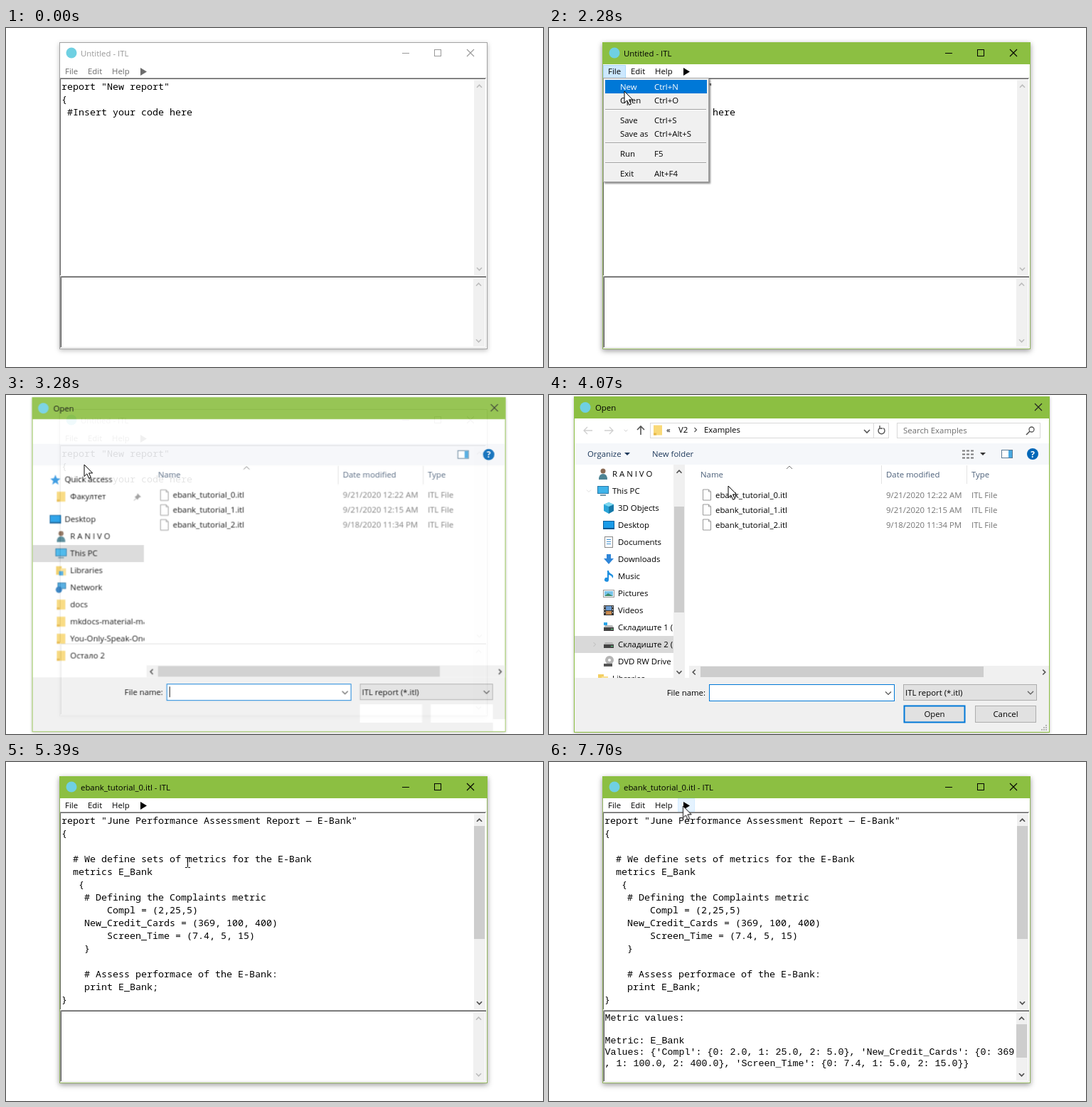
Recreate the animation shown at these times as an HTML page. Size 755x477 px, loop 8000 ms.

```html
<!DOCTYPE html>
<html lang="en">
<head>
<meta charset="utf-8">
<title>ITL editor</title>
<style>
html, body { margin: 0; width: 100%; height: 100%; overflow: hidden; background: #fff; }
svg { display: block; width: 755px; height: 477px; }
text { font: 11.4px "Open Sans", "Noto Sans", sans-serif; white-space: pre; }
.code text { font: 13.33px "Noto Sans Mono", "DejaVu Sans Mono", monospace; }
.out text { font: 13.33px "Liberation Mono", monospace; }
#dialog { transform-origin: 369.5px 238px; }
.shade { filter: drop-shadow(0 2px 3px rgba(0,0,0,.25)); }
.deep { filter: drop-shadow(0 3px 4px rgba(0,0,0,.18)); }
.thin { filter: drop-shadow(0 1px 2px rgba(0,0,0,.25)); }
.drop { filter: drop-shadow(2px 2px 1px rgba(0,0,0,.45)); }
</style>
</head>
<body>
<svg id="stage" viewBox="0 0 755 477"></svg>
<script>
const LOOP = 8000, GREEN = '#8cbf42', BLUE = '#0078d7';

// Drawing helpers
const T = (x, y, s, fill = '#000', more = '') => `<text x="${x}" y="${y}" fill="${fill}" ${more}>${s}</text>`;
const R = (x, y, w, h, fill, more = '') => `<rect x="${x}" y="${y}" width="${w}" height="${h}" fill="${fill}" ${more}/>`;
const box = (x, y, w, h, fill, stroke, sw = 1, cls = '') =>
  R(x + .5, y + .5, w - 1, h - 1, fill, `stroke="${stroke}" stroke-width="${sw}" class="${cls}"`);
const L = (d, stroke, w = 1, more = '') => `<path d="${d}" fill="none" stroke="${stroke}" stroke-width="${w}" ${more}/>`;
const P = (d, fill) => `<path d="${d}" fill="${fill}"/>`;
const C = (x, y, r, fill) => `<circle cx="${x}" cy="${y}" r="${r}" fill="${fill}"/>`;
const G = (id, s, more = '') => `<g id="${id}" ${more}>${s}</g>`;
const turns = { up: 0, right: 90, down: 180, left: 270 };
const chev = (x, y, dir, color, r = 3.5, w = 1.6) =>
  L(`M${-r} ${r / 2}L0 ${-r / 2}L${r} ${r / 2}`, color, w, `transform="translate(${x} ${y}) rotate(${turns[dir]})"`);
const lines = (x, y, step, list) => list.map((s, i) => s && T(x, y + i * step, s)).join('');
const cross = (x, y, c) => L(`M${x - 5} ${y - 5}l10 10m0-10l-10 10`, c, 1.1);
const bars = (x, top, bottom, c) => chev(x, top, 'up', c) + chev(x, bottom, 'down', c);

// Main window
const controls = c => L('M557 35.5h10', c) + box(602, 30, 10, 10, 'none', c) + cross(653, 35, c);
const menuBar = c => T(83, 65, 'File', c) + T(115, 65, 'Edit', c) + T(149, 65, 'Help', c) + P('M189 56l9 5.5-9 5.5z', c);
const badge = (x, y) => C(x, y, 7.5, '#6fd0e2');

const base =
  box(75, 20, 602, 432, '#fff', '#a3a3a3', 1, 'shade') +
  badge(92, 35) + T(105, 39.5, 'Untitled - ITL', '#999') + controls('#999') + menuBar('#6d6d6d');

const active =
  box(75, 20, 602, 432, '#fff', '#92b35f', 1, 'deep') +
  R(75, 20, 602, 31, GREEN) + badge(92, 35) + controls('#000') +
  G('title1', T(105, 39.5, 'Untitled - ITL')) +
  G('title2', T(105, 39.5, 'ebank_tutorial_0.itl - ITL')) +
  G('fileOn', box(76, 52, 32, 19, '#cce8ff', '#a9d8fb')) +
  G('runOn', box(181, 51, 24, 19, '#e5f3ff', '#d5ecff')) + G('runDown', R(181, 51, 24, 19, '#cce8ff')) +
  menuBar('#000');

const panes =
  R(76, 70, 599, 279, '#fff') + L('M76 70.5H675', '#a0a0a0') + L('M76.5 348V71.5H674', '#696969') +
  R(658, 73, 16, 275, '#f0f0f0') + bars(665.5, 82, 339, '#bcbcbc') +
  R(76, 349, 599, 101, '#fff') + L('M76.5 450V349.5H675', '#a0a0a0') + L('M77.5 449V350.5H675', '#555') +
  L('M77 449.5H674.5V351', '#e3e3e3') +
  R(657, 352, 16, 96, '#f0f0f0') + bars(664.5, 361, 440, '#bcbcbc');

const code1 = lines(78, 87, 18, ['report "New report"', '{', ' #Insert your code here']);
const code2 = lines(78, 87, 18, [
  'report "June Performance Assessment Report — E-Bank"', '{', '',
  '  # We define sets of metrics for the E-Bank', '  metrics E_Bank', '   {',
  '    # Defining the Complaints metric', '        Compl = (2,25,5)',
  '    New_Credit_Cards = (369, 100, 400)', '        Screen_Time = (7.4, 5, 15)', '    }', '',
  '    # Assess performace of the E-Bank:', '    print E_Bank;', '}']);
const output = lines(78.5, 364, 16, [
  'Metric values:', '', 'Metric: E_Bank',
  "Values: {'Compl': {0: 2.0, 1: 25.0, 2: 5.0}, 'New_Credit_Cards': {0: 369",
  ", 1: 100.0, 2: 400.0}, 'Screen_Time': {0: 7.4, 1: 5.0, 2: 15.0}}"]);

// File menu
const item = (y, name, key, c) => T(100, y, name, c) + T(148, y, key, c);
const lit = (y, name, key) => R(79, y - 14, 143, 19, BLUE) + item(y, name, key, '#fff');
const menu =
  box(76, 70, 149, 147, '#f0f0f0', '#a0a0a0', 1, 'drop') +
  [114, 161, 189].map(y => R(79, y, 142, 1, '#a0a0a0') + R(79, y + 1, 142, 1, '#fff')).join('') +
  item(87, 'New', 'Ctrl+N') + item(106, 'Open', 'Ctrl+O') + item(134, 'Save', 'Ctrl+S') +
  item(153, 'Save as', 'Ctrl+Alt+S') + item(181, 'Run', 'F5') + item(209, 'Exit', 'Alt+F4') +
  G('newOn', lit(87, 'New', 'Ctrl+N')) + G('openOn', lit(106, 'Open', 'Ctrl+O'));

// 16 by 16 icons
const sheet = box(2, 0, 12, 16, '#fff', '#8a8a8a');
const drive = R(1, 8, 14, 5, '#444') + P('M3 5h10l2 3H1z', '#b8b8b8') + R(11, 10, 3, 1, '#5fe08a');
const icons = {
  folder: R(2, 1, 12, 14, '#f9d978') + R(2, 12, 4, 3, '#e8b94a'),
  user: C(8, 4, 3.5, '#8a6b55') + P('M2 16q0-8 6-8t6 8z', '#4d8494'),
  pc: box(0, 1, 16, 11, '#3fb4ea', '#2878a8') + R(4, 13, 8, 2, '#7799aa'),
  cube: P('M8 0l7 3v9l-7 4-7-4V3z', '#2aa5d8') + P('M8 6l7-3v9l-7 4z', '#1679a8') + P('M8 0l7 3-7 3-7-3z', '#7fd8f0'),
  desktop: box(0, 2, 16, 12, '#1a9be8', '#0c5f9c') + R(1, 12, 14, 1, '#0c4f82'),
  doc: sheet + L('M5 4.5h6M5 7.5h6M5 10.5h6', '#3d8fd0'),
  down: P('M5 1h6v6h4l-7 8-7-8h4z', '#2f86d8'),
  note: P('M6 0h2q0 3 4 5t1 6q0-4-5-5v7a3 3 0 1 1-2-3z', '#1d8fe0'),
  pic: box(0, 3, 16, 11, '#fff', '#999') + R(2, 5, 12, 7, '#78c4ea') + P('M2 12l5-4 7 4z', '#3f8a68'),
  film: R(1, 1, 14, 14, '#333') + R(4, 2, 8, 6, '#6b9bd0') + R(4, 9, 8, 5, '#c78a50') +
    L('M2.5 2v12M13.5 2v12', '#ddd', 1, 'stroke-dasharray="2 2"'),
  drive,
  sys: drive + R(1, 1, 5, 4, '#2aa5e8'),
  disc: C(9, 6, 6, '#b5b5b5') + C(9, 6, 2, '#fff') + R(1, 11, 12, 4, '#555'),
  libs: R(1, 2, 8, 12, '#f3cf63') + R(6, 5, 9, 10, '#f9df90') + R(5, 9, 6, 6, '#48a8e0'),
  star: P('M8 1l2 5 5 .5-4 3.5 1.5 5-4.5-3-4.5 3 1.5-5-4-3.5 5-.5z', '#2c93e0'),
  net: box(3, 1, 12, 9, '#48a8e0', '#2878a8') + C(5, 11, 4.5, '#2c7cc0'),
  page: P('M2.5 .5h8l3 3v12h-11z', '#fff') + L('M2.5 .5h8l3 3v12h-11zM10.5 .5v3h3', '#999')
};
const icon = (k, x, y) => `<g transform="translate(${x} ${y - 8})">${icons[k]}</g>`;
const entry = ([k, s], x, y) => icon(k, x - 21, y) + T(x, y + 4, s);

const person = 'R A N I V O';
const tree = [['user', person], ['pc', 'This PC'], ['cube', '3D Objects'], ['desktop', 'Desktop'], ['doc', 'Documents'],
  ['down', 'Downloads'], ['note', 'Music'], ['pic', 'Pictures'], ['film', 'Videos'], ['sys', 'Складиште 1 (E:)'],
  ['drive', 'Складиште 2 (F:)'], ['disc', 'DVD RW Drive'], ['libs', 'Libraries']];
const places = [['user', person], ['pc', 'This PC'], ['libs', 'Libraries'], ['net', 'Network'], ['folder', 'docs'],
  ['folder', 'mkdocs-material-master'], ['folder', 'You-Only-Speak-Once'], ['folder', 'Остало 2']];

const sideFirst = R(36, 211, 157, 24, '#d9d9d9') +
  entry(['star', 'Quick access'], 81, 118.5) + entry(['folder', 'Факултет'], 89, 142.5) +
  P('M184 138l5 5-3 1-2 3-4-4 3-2z', '#999') + L('M179 148l3-3', '#999') + entry(['desktop', 'Desktop'], 81, 174.5) +
  places.map((p, i) => entry(p, 89, 198.7 + i * 24.1)).join('');
const sideFull = R(36, 339, 139, 24, '#d9d9d9') + G('sideHover', R(36, 99, 139, 24, '#e5f3ff')) +
  G('twigs', chev(56, 135, 'down', '#ddd', 3, 1) + chev(64, 351, 'right', '#bbb', 3, 1)) +
  tree.map((p, i) => entry(p, i < 2 || i > 11 ? 89 : 97, 111 + i * 24)).join('') +
  R(175, 98, 16, 300, '#f0f0f0') + R(176, 157, 14, 149, '#cdcdcd') + bars(183, 108, 390, '#505050');

// Open dialog
const files = ['9/21/2020 12:22 AM', '9/21/2020 12:15 AM', '9/18/2020 11:34 PM'].map((d, i) => {
  const y = 140.5 + i * 21;
  return icon('page', 214, y) + T(234, y + 4, `ebank_tutorial_${i}.itl`) + T(474, y + 4, d, '#747474') + T(594, y + 4, 'ITL File', '#747474');
}).join('');

const arrow = (x, dir, c) => L(`M${x - dir * 6} 50h${dir * 12}m${-dir * 5}-5l${dir * 5} 5l${-dir * 5} 5`, c, 1.3);
const dash = y => `M581 ${y}h4m2 0h4m2 0h4`;
const chrome =
  arrow(55, -1, '#cfcfcf') + arrow(84, 1, '#cfcfcf') + chev(108, 50, 'down', '#cfcfcf', 2.5, 1) +
  L('M129 56V44m-5 5l5-5 5 5', '#555', 1.6) +
  box(142, 39, 336, 22, '#fff', '#d9d9d9') + icon('folder', 145, 49.5) + T(165, 53, '«') + T(182, 53, 'V2') +
  chev(206, 49, 'right', '#555', 3, 1.2) + T(218, 53, 'Examples') + chev(447, 51, 'down', '#555', 4) + L('M456.5 40v20', '#d9d9d9') +
  L('M470 46.5a4.5 4.5 0 1 1-5 0M465 43v4h4', '#555', 1.4) +
  box(489, 39, 202, 22, '#fff', '#d9d9d9') + T(498, 54, 'Search Examples', '#6d6d6d') +
  L('M676 51l-5 5', '#555', 1.6) + L('M675 48.5a3.5 3.5 0 1 1 7 0a3.5 3.5 0 1 1-7 0', '#555', 1.3) +
  T(54, 87, 'Organize', '#1e395b') + P('M106 81h8l-4 4z', '#1e395b') + T(145, 87, 'New folder', '#1e395b') +
  L(dash(78.5) + dash(83.5) + dash(88.5), '#7a7a7a', 2) + P('M606 81h8l-4 4z', '#333') +
  box(499, 437, 86, 24, '#e1e1e1', BLUE, 2) + T(542, 453, 'Open', '#000', 'text-anchor="middle"') +
  box(599, 437, 86, 24, '#e1e1e1', '#adadad') + T(642, 453, 'Cancel', '#000', 'text-anchor="middle"') +
  [0, 1, 2].map(r => [...Array(r + 1).keys()].map(c => R(698 - c * 3, 464 + r * 3, 2, 2, '#b5b5b5')).join('')).join('');
const blanks = R(498, 436, 88, 26, '#fff') + R(598, 436, 88, 26, '#fff') + R(686, 457, 17, 17, '#fff');

const dialog =
  box(35, 2, 669, 473, '#fff', GREEN, 1, 'thin') + R(35, 2, 669, 31, GREEN) +
  G('head', badge(51, 17.5) + T(65, 22, 'Open') + cross(688, 17, '#222')) + G('headBare', T(45, 22, 'Open')) +
  R(36, 68, 667, 30, '#f5f7fa') +
  box(636, 77, 16, 12, '#fff', '#5a7a94') + R(646, 78, 5, 10, '#48a8e0') +
  C(680, 83, 8, '#0067b8') + T(680, 87.5, '?', '#fff', 'text-anchor="middle" style="font-size:12px;font-weight:700"') +
  G('side1', sideFirst, 'clip-path="url(#clip1)"') + G('side2', sideFull, 'clip-path="url(#clip2)"') +
  T(213, 116, 'Name', '#4c607a') + T(474, 116, 'Date modified', '#4c607a') + T(594, 116, 'Type', '#4c607a') +
  L('M467.5 99v26M587.5 99v26', '#e3e3e3') + chev(338, 102, 'up', '#777', 4, 1) +
  G('rowHover', R(211, 131, 492, 21, '#e5f3ff')) + G('rowOn', box(211, 131, 492, 21, '#cce8ff', '#99d1ff')) + files +
  R(197, 381, 506, 17, '#f0f0f0') + R(213, 382, 398, 15, '#cdcdcd') +
  chev(204, 390, 'left', '#505050') + chev(696, 390, 'right', '#505050') +
  R(36, 398, 667, 76, '#f0f0f0') +
  T(220, 423, 'File name:', '#000', 'text-anchor="end"') + box(225, 407, 261, 24, '#fff', BLUE) + chev(477, 419.5, 'down', '#555', 4, 1.2) +
  G('caret', R(229, 411, 1, 15, '#000')) + G('chosen', T(229, 423, 'ebank_tutorial_0.itl')) +
  box(498, 407, 188, 23, '#e1e1e1', '#adadad') + T(501, 423, 'ITL report (*.itl)') + chev(677, 419, 'down', '#555', 4, 1.2) +
  G('blanks', blanks) + G('chrome', chrome);

const pointer =
  `<circle id="ring" cx="0" cy="4" r="11.5" fill="#f5ea40" fill-opacity=".78"/>` +
  G('arrow', `<path d="M0 0v16.5l3.8-3.6 2.9 6.4 2.7-1.2-2.9-6.2h5.2z" fill="#fff" stroke="#000"/>`) +
  G('beam', L('M-3-2.5h2.5l1 1 1-1h2.5M.5-1.5v12M-3 11.5h2.5l1-1 1 1h2.5', '#000'));

stage.innerHTML =
  `<clipPath id="clip1">${R(36, 98, 157, 300, '#000')}</clipPath><clipPath id="clip2">${R(36, 98, 155, 300, '#000')}</clipPath>` +
  base + G('active', active) + panes +
  G('code1', code1, 'class="code"') + G('code2', code2, 'class="code"') +
  G('thumb', R(658, 90, 15, 159, '#cdcdcd') + bars(665.5, 82, 339, '#505050')) +
  G('output', output + R(657, 369, 15, 47, '#cdcdcd') + bars(664.5, 361, 440, '#505050'), 'class="out"') +
  G('menu', menu) + G('dialog', dialog) + G('pointer', pointer);

// Timeline, in ms, written out as CSS keyframes
let css = '';
const pct = t => `${(t / LOOP * 100).toFixed(4)}%`;
const animate = (id, frames) => {
  css += `@keyframes ${id}{${frames.join('')}}#${id}{animation:${id} ${LOOP}ms step-end infinite}`;
};
const show = (id, ...spans) => {
  const keys = { 0: 0 };
  for (const [a, b] of spans) { keys[a] = 1; keys[b] = b < LOOP ? 0 : 1; }
  animate(id, Object.entries(keys).map(([t, o]) => `${pct(t)}{opacity:${o}}`));
};

show('active', [1430, 2830], [4790, LOOP]);
show('title1', [0, 5390]);
show('title2', [5390, LOOP]);
show('fileOn', [1360, 2750]);
show('runOn', [7094, LOOP]);
show('runDown', [7400, 7620]);
show('code1', [0, 5250]);
show('code2', [5250, LOOP]);
show('thumb', [5320, LOOP]);
show('output', [7620, LOOP]);
show('menu', [1590, 2750]);
show('newOn', [2120, 2349]);
show('openOn', [2349, 2750]);
show('head', [0, 4615]);
show('headBare', [4615, LOOP]);
show('side1', [0, 3440]);
show('side2', [3440, LOOP]);
show('sideHover', [3440, 3670]);
show('twigs', [3440, 4390]);
show('caret', [2900, 3440]);
show('blanks', [0, 3355]);
show('chrome', [3355, LOOP]);
show('rowHover', [4148, 4235]);
show('rowOn', [4235, 4790]);
show('chosen', [4235, 4790]);
show('arrow', [750, 4790], [7094, LOOP]);
show('beam', [4790, 7094]);
show('ring', [1360, 1510], [2501, 2750], [4235, 4790], [7400, 7620]);

// time, opacity, scale
animate('dialog', [
  [0, 0, 1], [2900, .1, .93], [2990, .35, .96], [3080, .6, .98], [3170, .8, .99], [3260, .9, .9955], [3355, 1, 1],
  [4550, .92, .997], [4615, .74, .989], [4710, .3, .96], [4790, 0, 1]
].map(([t, o, s]) => `${pct(t)}{opacity:${o};transform:scale(${s})}`));

// time, x, y, steps taken on the way to the next point
animate('pointer', [
  [0, 3, 190, 0], [750, 3, 190, 4], [1054, 56, 104, 4], [1358, 90, 60, 0],
  [2045, 90, 60, 4], [2349, 106, 89, 2], [2501, 110, 98, 0],
  [3662, 110, 98, 4], [3986, 225, 118, 2], [4148, 252, 128, 1], [4229, 255, 137, 0],
  [6480, 255, 137, 10], [7247, 188.5, 62, 0], [LOOP, 188.5, 62, 0]
].map(([t, x, y, n]) => `${pct(t)}{transform:translate(${x}px,${y}px);animation-timing-function:${n ? `steps(${n},start)` : 'step-end'}}`));

document.head.appendChild(document.createElement('style')).textContent = css;
</script>
</body>
</html>
```
